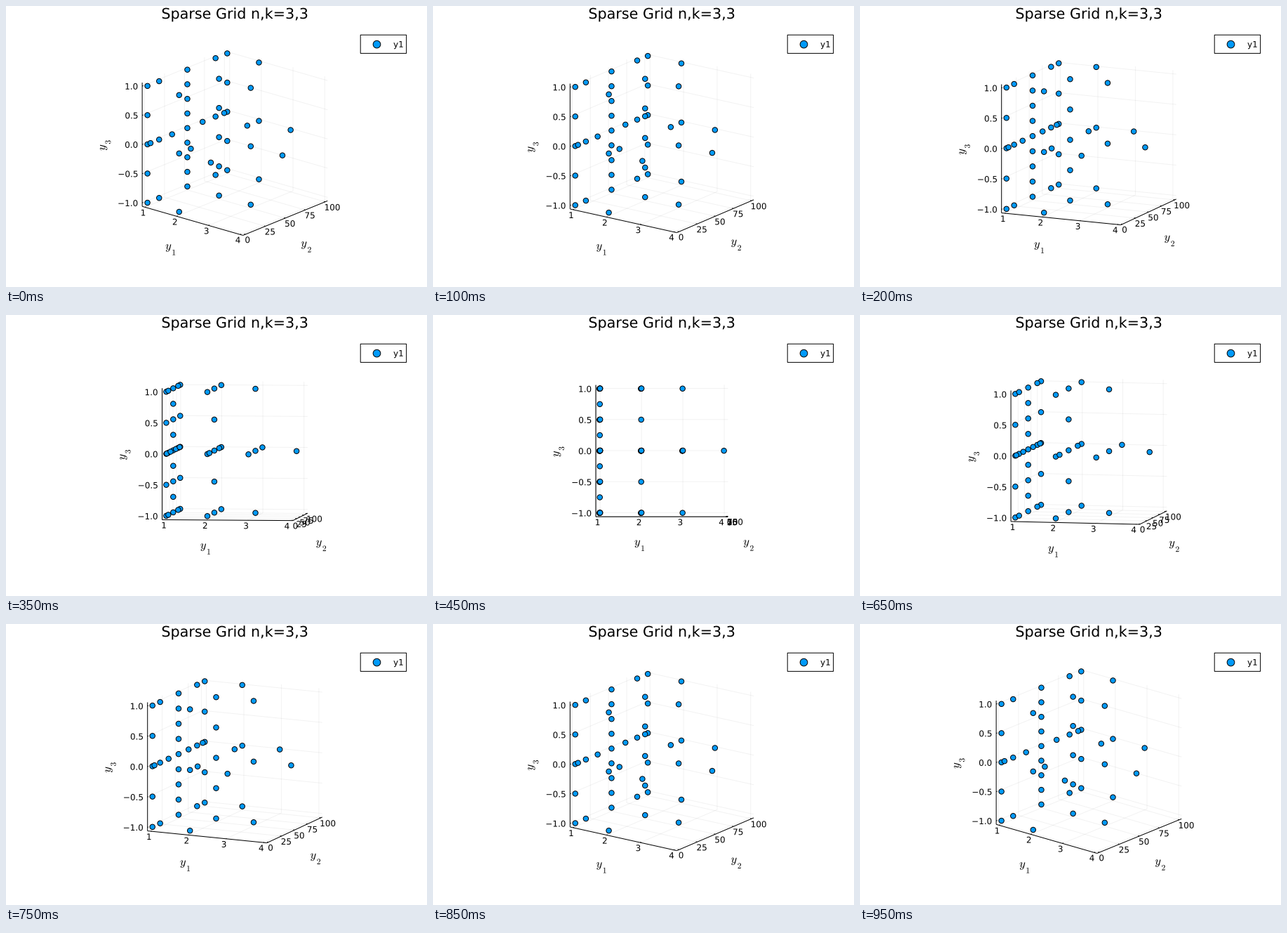
A matplotlib script for the animation above (1 s loop, 600 by 400 pixels).

```python
import itertools
import math

import matplotlib.pyplot as plt
from matplotlib.animation import FuncAnimation
from matplotlib.patches import Circle, PathPatch, Rectangle
from matplotlib.path import Path
from matplotlib.textpath import TextPath

WIDTH, HEIGHT, DPI = 600, 400, 100
FRAMES, INTERVAL = 20, 50
PX = 72 / DPI                      # points per pixel
CENTER, SIZE = (326.2, 193.2), 187.5
WIDEN = 1.06                       # axis limits exceed the data by 3% per side
BLUE = (0, 0.6056, 0.9787)
LO, HI = -0.5, 0.5

X_TICKS = [1, 2, 3, 4]
Y_TICKS = [0, 25, 50, 75, 100]
Z_TICKS = [-1, -0.5, 0, 0.5, 1]

plt.rcParams["path.snap"] = False


def unit(value, low, high):
    """Map a data value into the unit cube centred on the origin."""
    return ((value - low) / (high - low) - 0.5) / WIDEN


def unit_x(x): return unit(x, 1, 4)
def unit_y(y): return unit(y, 0, 100)
def unit_z(z): return unit(z, -1, 1)


def chebyshev(*steps):
    return [50 * (1 - math.cos(math.pi * s / 8)) for s in steps]


def sparse_grid(depth=3):
    xs = [[1], [2], [3], [4]]
    ys = [[50], [0, 100], chebyshev(2, 6), chebyshev(1, 3, 5, 7)]
    zs = [[0], [-1, 1], [-0.5, 0.5], [-0.75, -0.25, 0.25, 0.75]]
    points = []
    for i, j, k in itertools.product(range(depth + 1), repeat=3):
        if i + j + k <= depth:
            points += itertools.product(xs[i], ys[j], zs[k])
    return [(unit_x(x), unit_y(y), unit_z(z)) for x, y, z in points]


POINTS = sparse_grid()

fig = plt.figure(figsize=(WIDTH / DPI, HEIGHT / DPI), dpi=DPI, facecolor="white")
ax = fig.add_axes([0, 0, 1, 1])


def camera(azimuth, elevation):
    ca, sa = math.cos(azimuth), math.sin(azimuth)
    ce, se = math.cos(elevation), math.sin(elevation)

    def project(x, y, z):
        return (CENTER[0] + SIZE * (x * ca + y * sa),
                CENTER[1] + SIZE * ((x * sa - y * ca) * se - z * ce))
    return project


def text(x, y, string, size=12, align=0.5, vertical=False):
    """Place the ink box of a string: align 0 is left, 1 is right."""
    glyphs = TextPath((0, 0), string, size=size,
                      prop={"family": "DejaVu Sans", "math_fontfamily": "cm"})
    box = glyphs.get_extents()
    v = glyphs.vertices - [box.x0 + align * box.width, (box.y0 + box.y1) / 2]
    v = -v[:, ::-1] if vertical else v * [1, -1]
    ax.add_patch(PathPatch(Path(v + [x, y], glyphs.codes),
                           fc="black", lw=0, zorder=5))


def axis_name(x, y, index, vertical=False):
    for string, size, along, down in (("$y$", 16.5, -3.8, -3),
                                      (f"${index}$", 11.6, 4, 3.2)):
        dx, dy = (down, -along) if vertical else (along, down)
        text(x + dx, y + dy, string, size, vertical=vertical)


def disc(x, y, radius):
    ax.add_patch(Circle((x, y), radius, fc=BLUE, ec="black", lw=PX, zorder=4))


def line(project, *corners, alpha=1.0):
    xs, ys = zip(*(project(*c) for c in corners))
    ax.plot(xs, ys, color="black", alpha=alpha, lw=PX, zorder=2,
            solid_capstyle="butt", solid_joinstyle="miter")


def draw_grid(project):
    paths = []
    for x in map(unit_x, X_TICKS):
        paths.append([(x, LO, LO), (x, HI, LO), (x, HI, HI)])
    for y in map(unit_y, Y_TICKS):
        paths.append([(HI, y, LO), (LO, y, LO), (LO, y, HI)])
    for z in map(unit_z, Z_TICKS):
        paths.append([(LO, LO, z), (LO, HI, z), (HI, HI, z)])
    for path in paths:
        line(project, *path, alpha=0.05)


def draw_axes(project):
    tick = 0.012
    line(project, (LO, LO, LO), (HI, LO, LO))
    line(project, (HI, LO, LO), (HI, HI, LO))
    line(project, (LO, LO, LO), (LO, LO, HI))

    for value in X_TICKS:
        x = unit_x(value)
        line(project, (x, LO, LO), (x, LO + tick, LO))
        px, py = project(x, LO, LO)
        text(px, py + 7.7, str(value), align=1)
    for value in Y_TICKS:
        y = unit_y(value)
        line(project, (HI, y, LO), (HI - tick, y, LO))
        px, py = project(HI, y, LO)
        text(px, py + 7.7, str(value), align=0)
    for value in Z_TICKS:
        z = unit_z(value)
        line(project, (LO, LO, z), (LO, LO + tick, z))
        px, py = project(LO, LO, z)
        text(px - 6.7, py + 0.3, f"{value:.1f}".replace("-", "\u2212"), align=1)

    px, py = project(0, LO, LO)
    axis_name(px - 30.7, py + 41.6, 1)
    px, py = project(HI, 0, LO)
    axis_name(px + 30.4, py + 41.6, 2)
    px, py = project(LO, LO, 0)
    axis_name(px - 52, py + 0.6, 3, vertical=True)


def draw_legend():
    ax.add_patch(Rectangle((505.2, 41.2), 65.4, 26.2,
                           fc="white", ec="black", lw=PX))
    disc(528.5, 54.6, 5.3)
    text(559, 55.6, "y1")


def update(frame):
    ax.clear()
    ax.set(xlim=(0, WIDTH), ylim=(HEIGHT, 0))
    ax.axis("off")
    swing = 1 + math.cos(2 * math.pi * frame / (FRAMES - 1))
    project = camera(math.radians(20 * swing), math.radians(10 * swing))
    draw_grid(project)
    draw_axes(project)
    for point in POINTS:
        disc(*project(*point), 3.7)
    text(326, 12.3, "Sparse Grid n,k=3,3", 20.7)
    draw_legend()


animation = FuncAnimation(fig, update, frames=FRAMES, interval=INTERVAL,
                          init_func=lambda: None, repeat=True)
plt.show()
```
